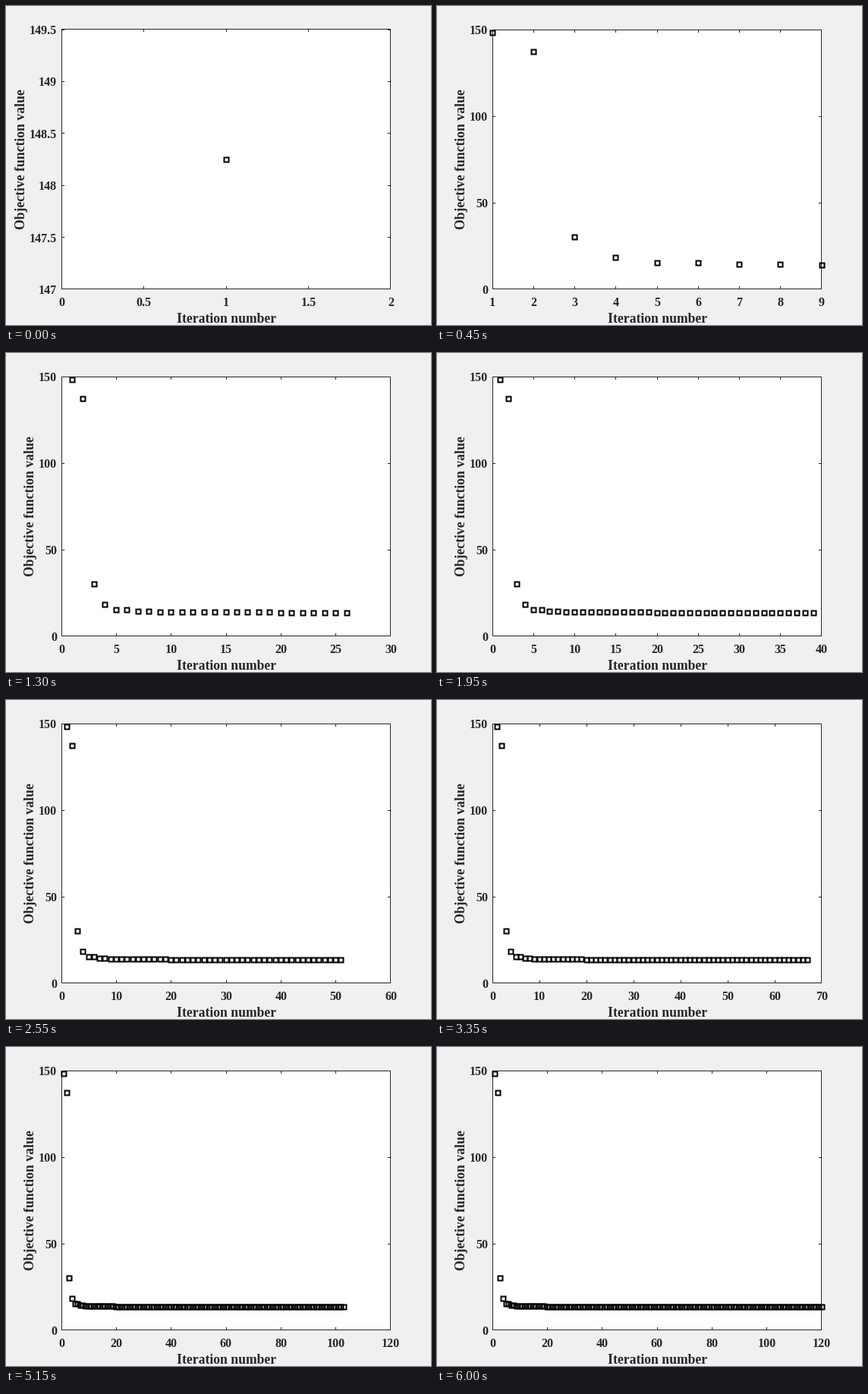
Write a matplotlib script that moves like this. It is 560 px wide and 420 px high and loops after 6.05 s.

```python
import numpy as np
import matplotlib.pyplot as plt
from matplotlib.animation import FuncAnimation
from matplotlib.collections import LineCollection, PolyCollection
from matplotlib.patches import Rectangle

W, H, DPI = 560, 420, 100
LEFT, RIGHT, BOTTOM = 73.5, 506.5, 372.5   # centres of the frame lines
X0, Y0, SPAN_X, SPAN_Y = 73, 373.1, 434, 342   # data area
INK = (0.15, 0.15, 0.15)
TICK = 3.6
MAX_INTERVALS = 9
STEPS = [m * 10.0 ** e for e in range(-2, 3) for m in (1, 2, 5)]

plt.rcParams.update({"font.family": "Liberation Serif", "font.weight": "bold"})

# Fast drop, then two nearly flat plateaus.
head = [148.25, 137.1, 30.1, 18.2, 15.2, 15.2, 14.3, 14.3]
values = np.array(head + [13.9] * 11 + [13.4] * 101)


def nice_axis(a, b):
    """Tightest rounded limits, with the most ticks that still fit."""
    if a == b:
        a, b = a - 1, b + 1
    options = []
    for s in STEPS:
        lo, hi = np.floor(a / s + 1e-9), np.ceil(b / s - 1e-9)
        if hi - lo <= MAX_INTERVALS:
            options.append((round((hi - lo) * s, 6), s, lo, hi))
    _, s, lo, hi = min(options)
    return lo * s, hi * s, np.arange(lo, hi + 1) * s


def px(points):
    return points * 72 / DPI


def snap(v):
    """Centre of the pixel that holds v."""
    return np.floor(v + 1e-6) + 0.5


def label(x, y, text, size=16, **kw):
    ax.text(x, y, text, fontsize=px(size), color=INK, va="baseline", **kw)


def squares(xs, ys, r=3):
    corners = np.array([(-r, -r), (r, -r), (r, r), (-r, r)])
    return np.column_stack([xs, ys])[:, None, :] + corners


fig = plt.figure(figsize=(W / DPI, H / DPI), dpi=DPI, facecolor="#f0f0f0")
ax = fig.add_axes([0, 0, 1, 1])


def draw(i):
    n = max(1, i)
    ax.clear()
    ax.set(xlim=(0, W), ylim=(H, 0))
    ax.axis("off")
    top = 30.5 if n == 1 else 31.5

    x0, x1, xticks = nice_axis(1, n)
    seen = values[:n]
    y0, y1, yticks = nice_axis(seen.min(), seen.max())

    def to_x(v):
        return X0 + (v - x0) / (x1 - x0) * SPAN_X

    def to_y(v):
        return Y0 - (v - y0) / (y1 - y0) * SPAN_Y

    ax.add_patch(Rectangle((LEFT, top), RIGHT - LEFT, BOTTOM - top, fc="white",
                           ec=INK, lw=px(1), joinstyle="miter", snap=False))

    lines = []
    for t in xticks:
        x = to_x(t)
        col = min(snap(x), RIGHT)
        lines += [[(col, BOTTOM), (col, BOTTOM - TICK)],
                  [(col, top), (col, top + TICK)]]
        label(x, 395, f"{t:g}", ha="center")
    for t in yticks:
        y = to_y(t)
        row = np.clip(snap(y), top, BOTTOM)
        lines += [[(LEFT, row), (LEFT + TICK, row)],
                  [(RIGHT, row), (RIGHT - TICK, row)]]
        label(67.2, y + 5.8, f"{t:g}", ha="right")
    ax.add_collection(LineCollection(lines, colors=[INK], linewidths=px(1),
                                     capstyle="butt", snap=False),
                      autolim=False)

    label(290.6, 417, "Iteration number", 17.6, ha="center")
    digits = max(len(f"{t:g}") for t in yticks)
    label(25 if digits > 3 else 37, 201.6, "Objective function value", 17.6,
          ha="center", rotation=90, rotation_mode="anchor")

    marks = squares(snap(to_x(np.arange(1, n + 1))), snap(to_y(seen)))
    ax.add_collection(PolyCollection(marks, facecolors="none",
                                     edgecolors="black", linewidths=px(2),
                                     joinstyle="miter", snap=False,
                                     clip_on=False, zorder=3),
                      autolim=False)
    return []


anim = FuncAnimation(fig, draw, frames=121, interval=50, repeat=True,
                     repeat_delay=0, init_func=lambda: draw(0))
plt.show()
```
